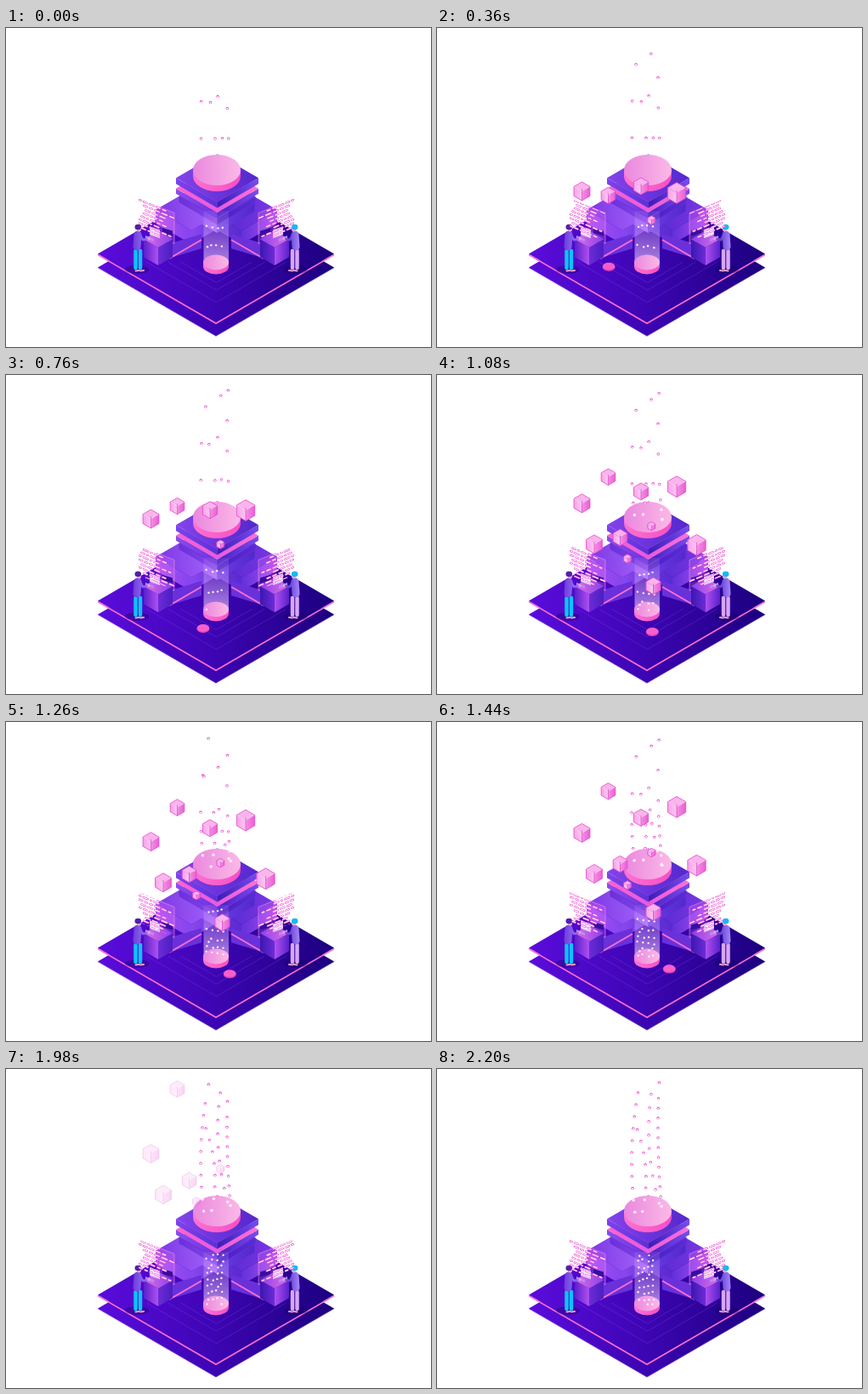
Recreate the animation shown at these times as an HTML page with a canvas. Size 500 by 375 pixels, loop 2220 ms.

```html
<!DOCTYPE html>
<html lang="en">
<head>
<meta charset="utf-8">
<title>Isometric data tower</title>
<style>
  html, body { margin: 0; width: 100%; height: 100%; overflow: hidden; background: #fff; }
  canvas { display: block; width: 500px; height: 375px; }
</style>
</head>
<body>
<canvas id="stage" width="500" height="375"></canvas>
<script>
const LOOP = 2220, W = 500, H = 375, MID = 247.5, SLOPE = 0.58;
const stage = document.getElementById('stage').getContext('2d');
const backdrop = document.createElement('canvas');
backdrop.width = W;
backdrop.height = H;
let g = backdrop.getContext('2d');

const clamp = v => Math.max(0, Math.min(1, v));
const fade = (t, from, to) => clamp((t - from) / 150) * clamp((to - t) / 150);
// Repeatable pseudo-random value in 0..1.
const noise = n => { const s = Math.sin(n * 127.1 + 3.7) * 43758.5453; return s - Math.floor(s); };

function across(x, width, ...colors) {
  const grad = g.createLinearGradient(x, 0, x + width, 0);
  colors.forEach((c, i) => grad.addColorStop(i / (colors.length - 1), c));
  return grad;
}
function trace(p) {
  g.beginPath();
  for (let i = 0; i < p.length; i += 2) g.lineTo(p[i], p[i + 1]);
}
function poly(fill, ...p) {
  trace(p);
  g.closePath();
  g.fillStyle = fill;
  g.fill();
}
function line(color, width, ...p) {
  trace(p);
  g.strokeStyle = color;
  g.lineWidth = width;
  g.stroke();
}
function oval(fill, x, y, rx, ry = rx) {
  g.beginPath();
  g.ellipse(x, y, rx, ry, 0, 0, 7);
  g.fillStyle = fill;
  g.fill();
}
function mirrored(draw) {
  draw(false);
  g.save();
  g.translate(MID * 2, 0);
  g.scale(-1, 1);
  draw(true);
  g.restore();
}
// Upright sheet running down to the right.
const sheet = (x, y, w, h, slope = SLOPE) =>
  [x, y, x + w, y + w * slope, x + w, y + w * slope + h, x, y + h];

// Isometric box: (x, y) is the front corner of its top, u and v its widths to the left and right.
function box(x, y, u, v, depth, top, left, right) {
  const a = u * SLOPE, b = v * SLOPE;
  poly(left, ...sheet(x - u, y - a, u, depth));
  poly(right, ...sheet(x, y, v, depth, -SLOPE));
  poly(top, x, y, x - u, y - a, x - u + v, y - a - b, x + v, y - b);
}
function puck(x, y, rx, ry, depth) {
  oval(across(x - rx, rx * 2, '#ff70d0', '#f74fc4'), x, y + depth, rx, ry);
  g.fillRect(x - rx, y, rx * 2, depth);
  oval(across(x - rx, rx * 2, '#ea88df', '#fbb9e6'), x, y, rx, ry);
}

function drawFloor() {
  const face = across(108, 278, '#5b0cdc', '#3c05b2', '#1c007e');
  box(247, 362, 139, 139, 0.5, face, face, face);
  box(247, 346, 139, 139, 2.2, face, '#ff6ccc', '#ff6ccc');
  for (const reach of [82, 57, 42]) {
    const y = 275 + reach * SLOPE;
    line('rgba(180,90,250,.28)', 0.8, MID - reach, 275, MID, y, MID + reach, 275);
  }
  mirrored(() => oval('rgba(20,0,90,.35)', 154, 284, 14, 5));
}

function drawWing(right) {
  box(218, 238, 42, 50, 16,
    across(176, 75, '#7a38e4', right ? '#5226cc' : '#a862fa'),
    across(176, 42, '#a850f2', right ? '#6430da' : '#8644ee'),
    across(218, 30, right ? '#5a2ad0' : '#8a48ee', '#6a34dc'));
  poly('#6a30da', ...sheet(194, 253, 36, 17, -0.3));
  line('#ff6fd2', 2, 192, 271, 230, 249);
}

function drawDesk(right) {
  box(179, 258, 17, 17, 21, across(162, 34, '#e070e4', '#8a40ea'),
    across(162, 17, '#5a20cc', '#b050f0'),
    across(179, 17, '#6c2cd8', right ? '#3c16b0' : '#4c1ec0'));
  poly('#34109e', ...sheet(184, 235, 12, 6, 0.3));
}

function drawPanel() {
  const screen = sheet(177, 209, 21, 36, 0.4);
  poly('rgba(225,120,250,.25)', ...screen);
  line('rgba(255,145,230,.7)', 0.8, ...screen);
}

function drawLaptop() {
  poly('#b78cf6', ...sheet(164, 244, 10, 3, 0.4));
  poly('#d9c8ff', ...sheet(169, 233, 12, 10, 0.35));
  poly('#f4e8ff', ...sheet(170, 235, 10, 7, 0.35));
}

function drawPerson(right) {
  const [hair, coat, legs] = right
    ? ['#18b9f2', across(149, 12, '#a988f8', '#6846d8'), '#d8a6f4']
    : ['#5121a6', across(149, 12, '#6a3bd6', '#8c66f2'), '#0cc4ff'];
  const skin = '#f4a0d8';
  g.lineCap = 'round';
  for (const x of [152.5, 158]) {
    line(skin, 2, x, 285.5, x + 4, 285);
    line(legs, 4.5, x, 262, x, 282);
  }
  line(coat, 9, 155, 243, 154, 257);
  line(coat, 2.6, 157, 242, 161, 249, 166, 248);
  oval(skin, 168, 247.5, 1.5);
  oval(skin, 156.5, 236.5, 2.6, 3);
  oval(hair, 155.3, 234, 3.8, 3.2);
  g.lineCap = 'butt';
}

function drawTower() {
  const x = 248.5;
  const tier = (y, w, depth, top, [outer, inner], [near, far]) =>
    box(x, y, w, w, depth, top, across(x - w, w, outer, inner), across(x, w, near, far));
  tier(231, 44, 10, '#8c48ee', ['#8a4aee', '#a463f8'], ['#6c3ce4', '#5228cc']);
  tier(224, 45, 7, '#6a2edc', ['#6a30d8', '#8747ec'], ['#4a20c4', '#5a2cd4']);
  tier(217, 48.5, 6, across(200, 97, '#ff62cc', '#e65adf', '#ff70d2'),
    ['#8a4cf0', '#6a34dc'], ['#4420bc', '#7a4cf0']);
  tier(204.5, 48.5, 7, across(200, 97, '#8444ea', '#6a34dc', '#5428cc'),
    ['#7c44ec', '#5c30d8'], ['#3c1cb4', '#774cf0']);
  puck(248, 167, 28, 18, 7);
  const beam = g.createLinearGradient(0, 212, 0, 275);
  beam.addColorStop(0, 'rgba(235,190,255,.08)');
  beam.addColorStop(1, 'rgba(245,210,255,.6)');
  g.fillStyle = beam;
  g.fillRect(232.5, 215, 29.5, 61);
  puck(247, 275.5, 15, 9, 5);
}

function drawScene() {
  drawFloor();
  mirrored(drawWing);
  drawTower();
  mirrored(right => {
    drawPanel();
    drawDesk(right);
    drawLaptop();
    drawPerson(right);
  });
}

const CODE_ROWS = 8, ROW_STEP = 4.6;

function drawCode(t) {
  const shift = t / LOOP * CODE_ROWS;
  g.save();
  trace(sheet(156, 200, 42, 35, 0.42));
  g.clip();
  g.lineCap = 'round';
  for (let i = -1; i <= CODE_ROWS; i++) {
    const key = (i + Math.floor(shift) + CODE_ROWS) % CODE_ROWS;
    const rowY = 202 + (i - shift % 1) * ROW_STEP;
    const at = x => rowY + (x - 157) * 0.42;
    const end = 180 + noise(key + 40) * 17;
    let x = 157 + Math.floor(noise(key) * 4) * 2.5;
    for (let k = 0; x < end; k++) {
      const next = x + 1 + noise(key * 9 + k) * 5;
      line('#ee4fd2', 2.4, x, at(x), next, at(next));
      line('#fff0fc', 1.2, x, at(x), next, at(next));
      x = next + 3.2;
    }
  }
  g.restore();
}

// Sparks rise in rows: sparse at first, then a dense stream.
const SPARSE = 355, DENSE = 115, RUSH = 1250;
const pulses = [];
for (let p = -SPARSE; p < LOOP + 300; p = p < RUSH - SPARSE ? p + SPARSE : Math.max(RUSH, p + DENSE)) pulses.push(p);

// Each column bends away from x as a parabola around the height mid.
const COLUMNS = [
  { x: 229, mid: 110, bend: 1 / 900, rate: 1 },
  { x: 246, mid: 130, bend: -1 / 330, rate: 0.98 },
  { x: 249, mid: 72, bend: 1 / 600, rate: 1.14 },
  { x: 260, mid: 70, bend: 1 / 2000, rate: 0.82 }
];

function drawSparks(t) {
  pulses.forEach((pulse, row) => COLUMNS.forEach(({ x, mid, bend, rate }, i) => {
    const y = 130 - (t - pulse) * 0.122 * rate;
    const sx = x + bend * (y - mid) ** 2;
    if (y > (bend < 0 ? 58 : 14) && y < 151) {
      oval('#ee4fd3', sx, y, 1.75);
      oval('#fff', sx, y + 0.4, 1);
    } else if (pulse > RUSH && y > 150 && y < 170) {
      oval('rgba(255,240,252,.9)', sx, y, 1.8);
    }
    const jitter = noise(row * 4 + i) - 0.5;
    const low = 245 - (t - pulse - 190) * 0.065 + jitter * 4;
    if (low > 217 && low < 277) oval('rgba(255,245,255,.95)', 237 + i * 5.8 + jitter * 3, low, 1.2);
  }));
}

function drawBead(t) {
  const turn = 950;
  const dx = (t - turn) * (t < turn ? 0.0745 : 0.0556);
  const x = 246 + dx, y = 306 - Math.abs(dx) * SLOPE;
  g.globalAlpha = clamp((t - 200) / 170) * clamp((1960 - t) / 200);
  oval('#e23cbc', x, y + 0.7, 7.5, 4.7);
  oval('#f75fc9', x, y - 0.5, 7.2, 4.3);
  g.globalAlpha = 1;
}

// Five cubes rise in two waves; each has one key point per wave.
const WAVES = [360, 1080];
const CUBES = [
  { r: 11, rise: 0.057, spots: [[170.5, 192], [185, 199]] },
  { r: 9.7, rise: 0.107, spots: [[201.5, 197], [215.5, 191]], slowdown: 0.62 },
  { r: 10, rise: 0.068, spots: [[240, 186], [254.5, 248]] },
  { r: 12.4, rise: 0.087, spots: [[282, 194], [305.5, 200]] },
  { r: 5.2, rise: 0.067, spots: [[252.3, 226], [224, 216]] }
];

function drawCube(x, y, r) {
  const w = r * 0.86, h = r / 2;
  poly(across(x - w, w, '#f6a2e9', '#fbc9f2'), x - w, y - h, x, y, x, y + r, x - w, y + h);
  poly(across(x, w, '#f391e3', '#e95fd4'), x + w, y - h, x, y, x, y + r, x + w, y + h);
  poly('#f9b5ec', x - w, y - h, x, y - r, x + w, y - h, x, y);
  line('rgba(220,60,195,.7)', 0.9, x, y - h * 0.5, x, y + r);
  const rim = [];
  for (let i = 0; i <= 6; i++) rim.push(x + w / 0.866 * Math.sin(i * Math.PI / 3), y - r * Math.cos(i * Math.PI / 3));
  line('#e645cd', 0.8, ...rim);
}

function drawCubes(t) {
  WAVES.forEach((at, wave) => {
    for (const { r, rise, spots, slowdown = 1 } of CUBES) {
      const [x, y] = spots[wave];
      const end = r < 6 || x < 235 ? 2020 : 1700;
      g.globalAlpha = fade(t, at - 200, end);
      if (g.globalAlpha > 0) drawCube(x, y - rise * slowdown ** wave * (t - at), r);
    }
  });
  g.globalAlpha = 1;
}

function render(t) {
  g.clearRect(0, 0, W, H);
  g.drawImage(backdrop, 0, 0);
  mirrored(() => drawCode(t));
  drawBead(t);
  drawSparks(t);
  drawCubes(t);
}

drawScene();
g = stage;
const began = performance.now();
function tick() {
  render((performance.now() - began) % LOOP);
  requestAnimationFrame(tick);
}
render(0);
requestAnimationFrame(tick);
</script>
</body>
</html>
```
